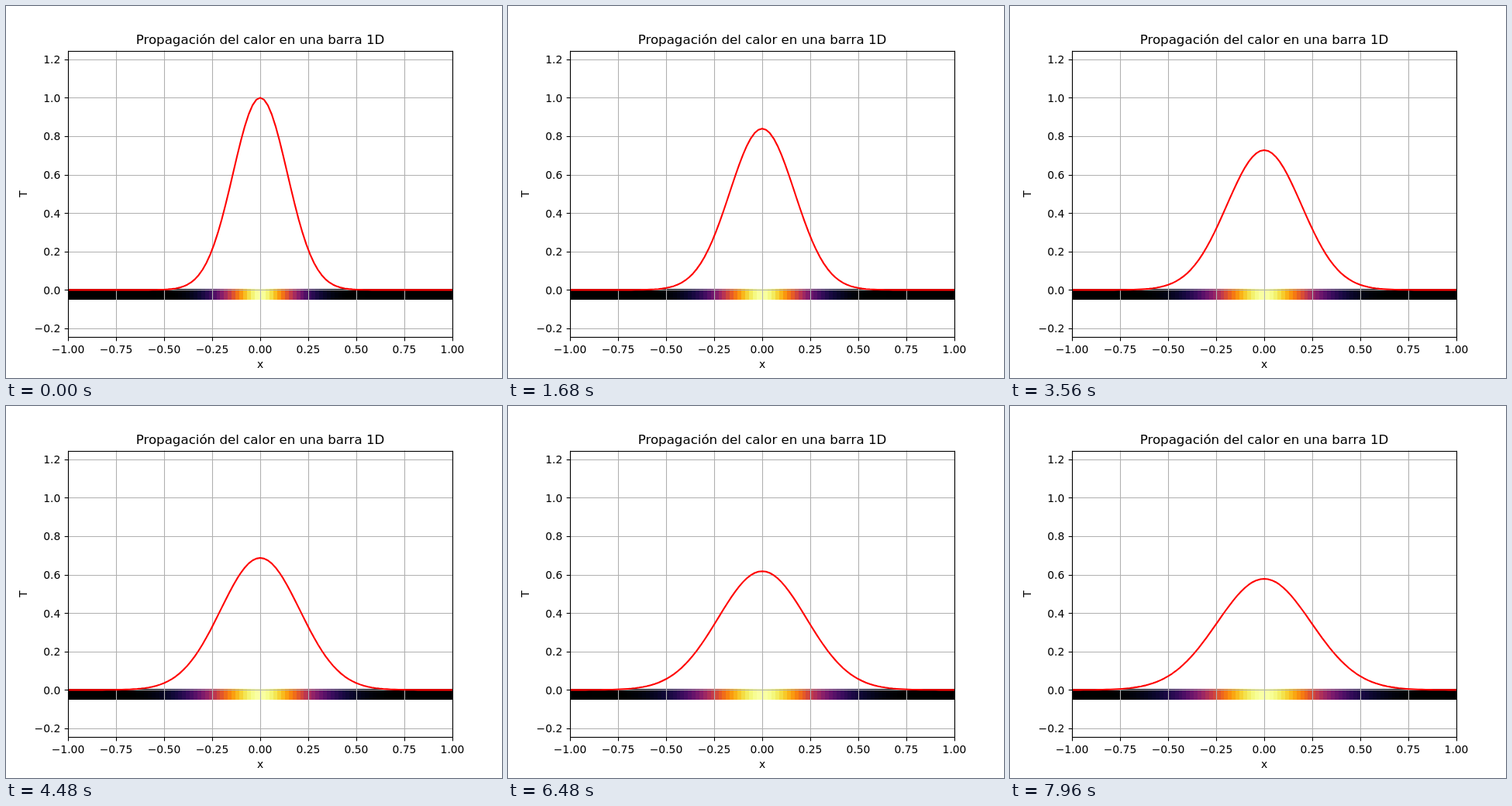
An HTML page with a canvas for the animation above (8000 ms loop, 640 by 480 pixels).

```html
<!DOCTYPE html>
<html lang="es">
<head>
<meta charset="utf-8">
<title>Propagación del calor</title>
<style>
  html, body { margin: 0; width: 100%; height: 100%; overflow: hidden; background: #fff; }
  canvas { display: block; }
</style>
</head>
<body>
<canvas id="stage" width="640" height="480"></canvas>
<script>
const ctx = document.getElementById('stage').getContext('2d');

const STEP_MS = 40, STEPS = 200;
const NODES = 101;
const UNIT = 248;                       // pixels per data unit on both axes
const AXES = { left: 80, right: 576, top: 57.6, bottom: 427.2 };
const BAR = { top: 365, bottom: 379 };
const THIN = 1.11, THICK = 2.083;

const px = x => 328 + x * UNIT;
const py = y => 366.4 - y * UNIT;
const snap = v => Math.floor(v + 0.5) + 0.5;
const range = (n, f) => Array.from({ length: n }, (_, i) => f(i));

const xTicks = range(9, i => -1 + i * 0.25);
const yTicks = range(8, i => (i - 1) / 5);
const nodes = range(NODES, i => -1 + 2 * i / (NODES - 1));

// Polynomial fit of the inferno colour map, lowest power first, per channel.
const INFERNO = [
  [0.000219, 0.106513, 11.602493, -41.703996, 77.162936, -71.319428, 25.131126],
  [0.001651, 0.563956, -3.972854, 17.436399, -33.402359, 32.626064, -12.242669],
  [-0.019481, 3.932712, -15.942394, 44.354145, -81.807309, 73.20952, -23.070325]
];
const inferno = v => 'rgb(' + INFERNO.map(c =>
  Math.round(255 * Math.min(1, Math.max(0, c.reduceRight((sum, k) => sum * v + k, 0))))) + ')';

function line(x1, y1, x2, y2) {
  ctx.beginPath();
  ctx.moveTo(x1, y1);
  ctx.lineTo(x2, y2);
  ctx.stroke();
}

function text(string, x, y, align = 'center', size = 13.89) {
  ctx.font = `${size}px "DejaVu Sans", sans-serif`;
  ctx.textAlign = align;
  ctx.fillText(string, x, y);
}

const label = (v, digits) => v.toFixed(digits).replace('-', '\u2212');

function drawBar(spread) {
  const edge = i => Math.round(AXES.left + i * 2 * UNIT / NODES);
  nodes.forEach((x, i) => {
    ctx.fillStyle = inferno(Math.exp(-25 * x * x / spread));
    ctx.fillRect(edge(i), BAR.top, edge(i + 1) - edge(i), BAR.bottom - BAR.top);
  });
}

function drawGrid() {
  ctx.strokeStyle = '#b0b0b0';
  ctx.lineWidth = THIN;
  for (const x of xTicks) line(snap(px(x)), AXES.top, snap(px(x)), AXES.bottom);
  for (const y of yTicks) line(AXES.left, snap(py(y)), AXES.right, snap(py(y)));
}

function drawCurve(spread) {
  ctx.save();
  ctx.beginPath();
  ctx.rect(AXES.left, 58, AXES.right - AXES.left, 369);
  ctx.clip();
  ctx.strokeStyle = '#f00';
  ctx.lineWidth = THICK;
  ctx.lineJoin = 'round';
  ctx.beginPath();
  for (const x of nodes) {
    ctx.lineTo(px(x), py(Math.exp(-25 * x * x / spread) / Math.sqrt(spread)));
  }
  ctx.stroke();
  ctx.restore();
}

function drawFrame() {
  const left = snap(AXES.left), top = snap(AXES.top), bottom = snap(AXES.bottom);
  ctx.strokeStyle = ctx.fillStyle = '#000';
  ctx.lineWidth = THIN;
  ctx.strokeRect(left, top, snap(AXES.right) - left, bottom - top);

  for (const x of xTicks) {
    line(snap(px(x)), bottom, snap(px(x)), bottom + 4.86);
    text(label(x, 2), px(x), 448);
  }
  for (const y of yTicks) {
    line(left, snap(py(y)), left - 4.86, snap(py(y)));
    text(label(y, 1), 70.3, Math.round(py(y) + 5.3), 'right');
  }

  text('Propagación del calor en una barra 1D', 328, 49, 'center', 16.67);
  text('x', 328, 467);
  ctx.save();
  ctx.translate(27, 242.4);
  ctx.rotate(-Math.PI / 2);
  text('T', 0, 0);
  ctx.restore();
}

function render(now) {
  const step = Math.floor(now / STEP_MS) % STEPS;
  const spread = 1 + step / 100;        // variance relative to the start
  ctx.fillStyle = '#fff';
  ctx.fillRect(0, 0, 640, 480);
  drawBar(spread);
  drawGrid();
  drawCurve(spread);
  drawFrame();
}

function tick() {
  render(performance.now());
  requestAnimationFrame(tick);
}
tick();
</script>
</body>
</html>
```
